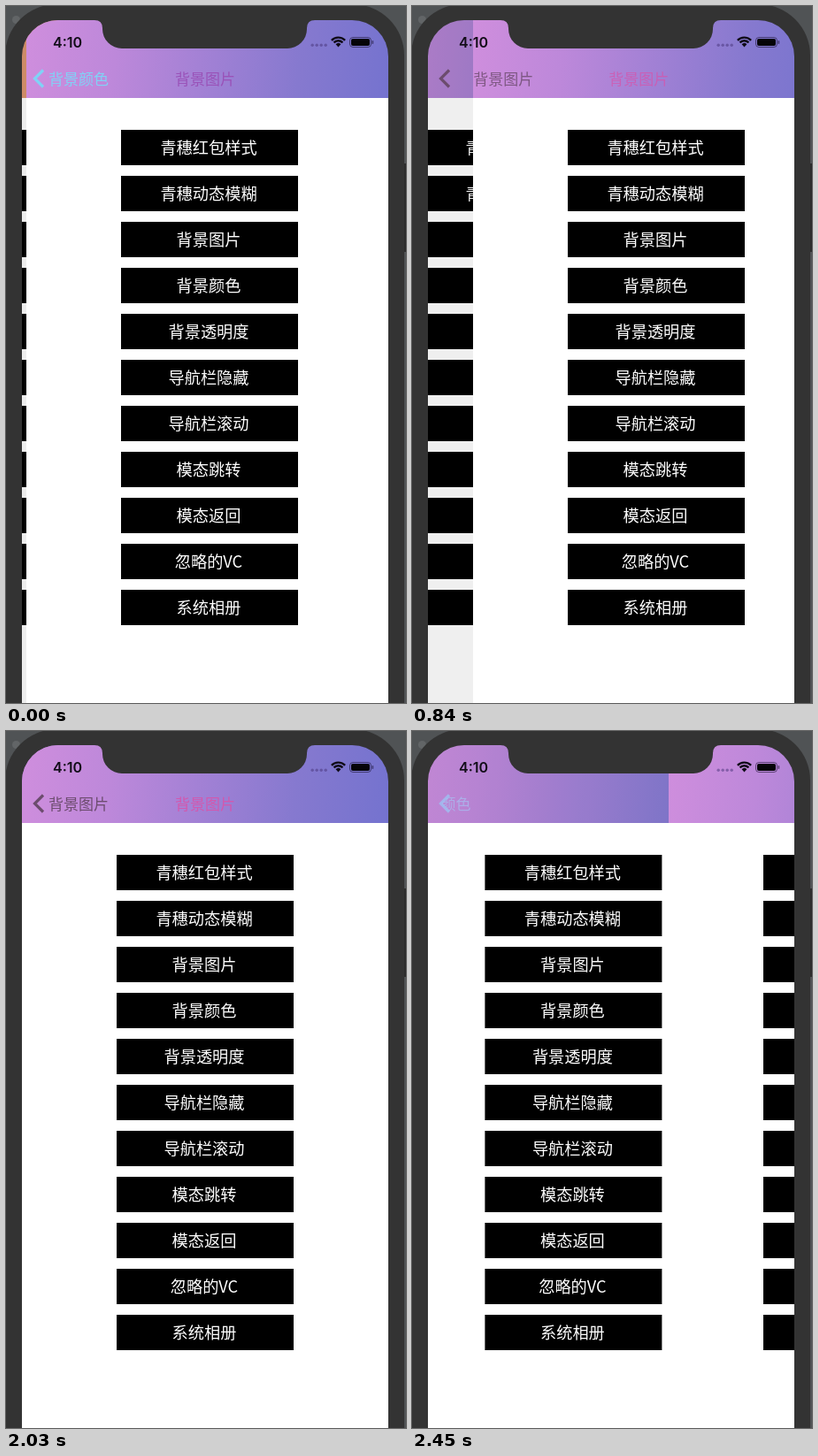
Write an HTML page with a canvas that moves like this. It is 452 px wide and 788 px high and loops after 2520 ms.

```html
<!DOCTYPE html>
<html lang="zh-CN">
<head>
<meta charset="utf-8">
<style>
html, body { margin: 0; width: 452px; height: 788px; overflow: hidden; background: #333; }
canvas { display: block; }
</style>
</head>
<body>
<canvas id="stage" width="452" height="788"></canvas>
<script>
const ctx = document.getElementById('stage').getContext('2d');
const LOOP = 2520, STEP = 70, LEFT = 18, TOP = 16, WIDTH = 414, NAV = 88;
const CJK = '"Noto Sans CJK SC", "Noto Sans CJK", sans-serif';
const MENU = ['青穗红包样式', '青穗动态模糊', '背景图片', '背景颜色', '背景透明度', '导航栏隐藏',
  '导航栏滚动', '模态跳转', '模态返回', '忽略的VC', '系统相册'];
const COLOR_PAGE = '背景颜色', IMAGE_PAGE = '背景图片';
const CYAN = '#80d2f6', PURPLE = '#9a52b8', BROWN = '#6c4c6e', PINK = '#d258ae', PALE = '#a3b5ec';
const PUSH_START = 652.5, DRAG_START = 2075;

const clamp = v => Math.max(0, Math.min(1, v));
// Critically damped spring: share of the way still to go after ms.
const spring = ms => { const x = Math.max(0, ms) * 0.0193; return (1 + x) * Math.exp(-x); };

function rect(x, y, w, h, fill) {
  ctx.fillStyle = fill;
  ctx.fillRect(x, y, w, h);
}

function roundRect(x, y, w, h, r, fill) {
  ctx.beginPath();
  ctx.roundRect(x, y, w, h, r);
  ctx.fillStyle = fill;
  ctx.fill();
}

function text(str, x, y, font, fill, align = 'left', alpha = 1) {
  ctx.globalAlpha = clamp(alpha);
  ctx.font = font;
  ctx.fillStyle = fill;
  ctx.textAlign = align;
  ctx.fillText(str, x, y);
  ctx.globalAlpha = 1;
}

const navText = (str, x, color, alpha) => text(str, x, 88.5, '17px ' + CJK, color, 'left', alpha);

function page(offset, solid) {
  const x = LEFT + offset;
  const shade = ctx.createLinearGradient(x, TOP, x + WIDTH, TOP + 40);
  shade.addColorStop(0, '#cf8edd');
  shade.addColorStop(0.25, '#bd88da');
  shade.addColorStop(0.75, '#8679cf');
  shade.addColorStop(1, '#7573cf');
  rect(x, TOP, WIDTH, NAV, solid || shade);
  rect(x, TOP + NAV, WIDTH, 700, '#fff');
  MENU.forEach((label, i) => {
    const y = 140 + 52 * i;
    rect(x + 107, y, 200, 40, '#000');
    text(label, x + 206, y + 27, '18.2px ' + CJK, '#fff', 'center');
  });
}

function pages(offset, underColor) {
  const toGo = offset / WIDTH;
  page(-0.3 * WIDTH * (1 - toGo), underColor);
  const dim = 0.07 * (1 - toGo);
  rect(LEFT, TOP, WIDTH, NAV, `rgba(0,0,0,${dim * 1.4})`);
  if (dim > 0.03) rect(LEFT, TOP + NAV, WIDTH, 700, `rgba(0,0,0,${dim})`);
  page(offset);
}

function chevron(color) {
  ctx.beginPath();
  ctx.moveTo(42, 72.5);
  ctx.lineTo(32.5, 82);
  ctx.lineTo(42, 91.5);
  ctx.lineWidth = 3.2;
  ctx.strokeStyle = color;
  ctx.stroke();
}

// Back labels vanish behind the inner edge of the chevron.
function clipLabels() {
  ctx.beginPath();
  ctx.moveTo(44, 70);
  ctx.lineTo(33, 82);
  ctx.lineTo(44, 94);
  ctx.lineTo(432, 104);
  ctx.lineTo(432, 60);
  ctx.clip();
}

function navigation(t, offset) {
  const p = 1 - offset / WIDTH;
  const dragging = t > DRAG_START, pushed = t > PUSH_START;
  chevron(dragging ? PALE : pushed ? BROWN : CYAN);
  ctx.save();
  clipLabels();
  if (dragging) {
    const done = 1 - p;
    navText(IMAGE_PAGE, 48 + 143 * done, '#8f93dc', 1 - done * 1.65);
    navText(COLOR_PAGE, 48 - 144 * p, '#a9b9ee', done * 1.2);
    navText(IMAGE_PAGE, 191 + 241 * done, PINK, 1 - done * 3);
  } else if (pushed) {
    const q = Math.pow(p, 1.23), fadeOut = 1 - q * 1.5, fadeIn = (q - 0.4) / 0.55;
    navText(COLOR_PAGE, 48 - 102 * q, BROWN, fadeOut);
    navText(IMAGE_PAGE, 191 - 143 * q, PURPLE, fadeOut * 1.3);
    navText(IMAGE_PAGE, 48 + 143 * (1 - q), BROWN, fadeIn);
    navText(IMAGE_PAGE, 191 + 210 * (1 - q), PINK, fadeIn);
  } else {
    navText(COLOR_PAGE, 48, CYAN);
    navText(IMAGE_PAGE, 191, PURPLE);
  }
  ctx.restore();
}

function statusBar() {
  text('4:10', 53, 46.5, '600 16px Inter, sans-serif', '#120d18');
  for (let i = 0; i < 4; i++) roundRect(344.5 + 5 * i, 42.5, 3.4, 3.4, 1.7, 'rgba(70,50,120,.5)');
  ctx.strokeStyle = '#100c18';
  ctx.lineWidth = 2.4;
  for (const r of [10.4, 6.8]) {
    ctx.beginPath();
    ctx.arc(375.5, 46, r, -Math.PI * 0.76, -Math.PI * 0.24);
    ctx.stroke();
  }
  ctx.beginPath();
  ctx.moveTo(375.5, 46.5);
  ctx.arc(375.5, 46, 4, -Math.PI * 0.76, -Math.PI * 0.24);
  ctx.fillStyle = '#100c18';
  ctx.fill();
  ctx.beginPath();
  ctx.roundRect(388.5, 35.5, 24, 11, 3.5);
  ctx.lineWidth = 1;
  ctx.strokeStyle = 'rgba(20,12,40,.55)';
  ctx.stroke();
  roundRect(390, 37, 21, 8, 2, '#050408');
  roundRect(413.6, 39, 1.6, 4, 0.8, 'rgba(20,12,40,.55)');
}

function notch() {
  ctx.beginPath();
  ctx.moveTo(100, 15);
  ctx.lineTo(100, 16);
  ctx.quadraticCurveTo(109, 16, 109, 25);
  ctx.arcTo(109, 48, 132, 48, 22);
  ctx.lineTo(318, 48);
  ctx.arcTo(340, 48, 340, 25, 22);
  ctx.lineTo(340, 25);
  ctx.quadraticCurveTo(340, 16, 349, 16);
  ctx.lineTo(349, 15);
  ctx.fillStyle = '#333';
  ctx.fill();
}

function draw(t) {
  rect(0, 0, 452, 788, '#505355');
  roundRect(7, 11, 9, 9, 4.5, '#626567');
  roundRect(-1, -2, 451, 900, 58, '#333');
  rect(450, 178, 2, 100, '#2b2b2b');

  let offset;
  if (t > DRAG_START) offset = 288 * (1 - Math.exp((DRAG_START - t) / 130.4));
  else offset = WIDTH * spring(t > PUSH_START ? t - PUSH_START : t + 333);
  offset = Math.round(offset);

  ctx.save();
  ctx.beginPath();
  ctx.roundRect(LEFT, TOP, WIDTH, 900, 41);
  ctx.clip();
  pages(offset, t < PUSH_START ? '#e39a72' : null);
  navigation(t, offset);
  statusBar();
  ctx.restore();
  notch();
}

const start = performance.now();
function tick() {
  const t = (performance.now() - start) % LOOP;
  draw(Math.floor(t / STEP) * STEP);
  requestAnimationFrame(tick);
}
tick();
</script>
</body>
</html>
```
